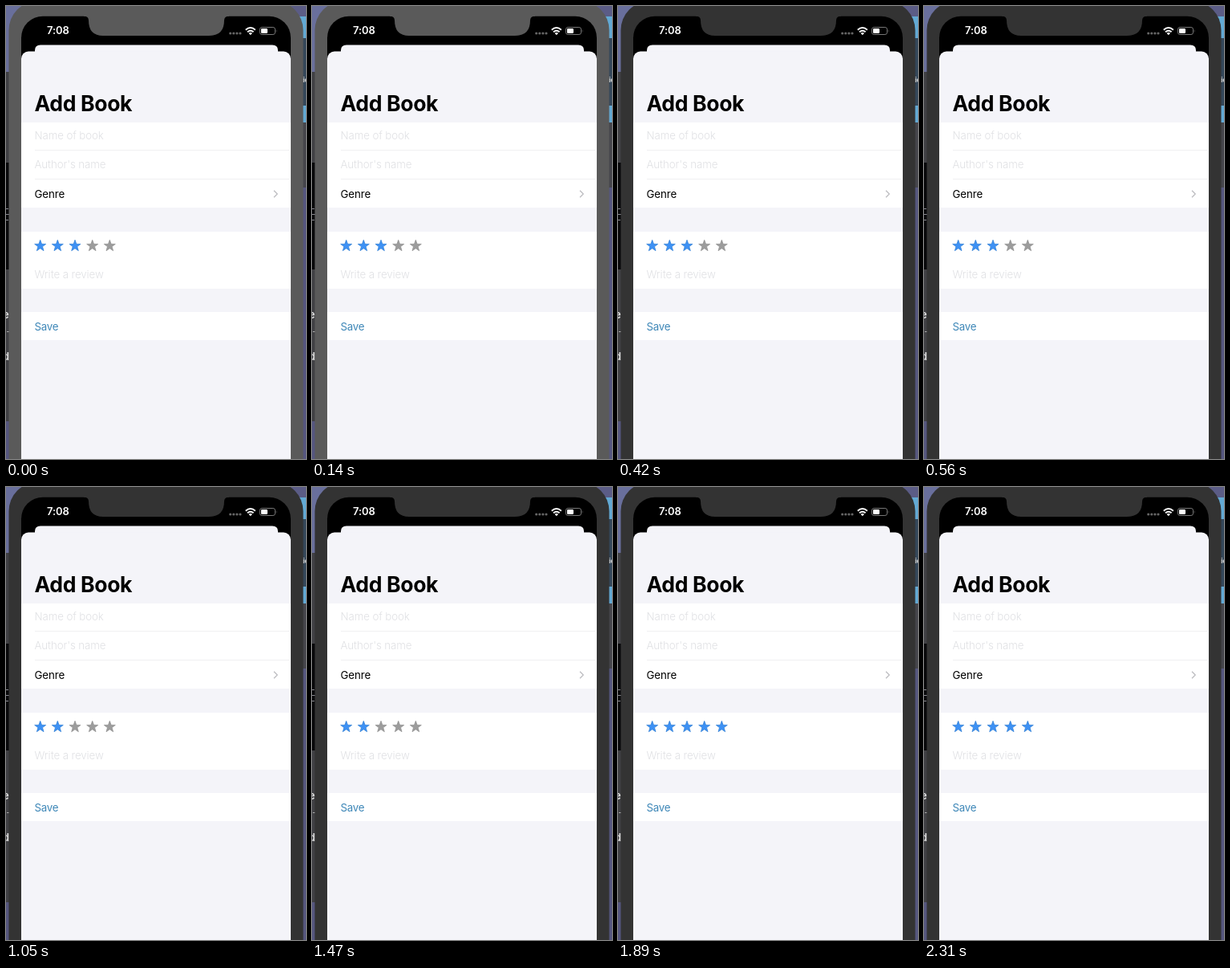
Write an HTML page that moves like this. It is 374 px wide and 564 px high and loops after 2380 ms.

```html
<!DOCTYPE html>
<html lang="en">
<head>
<meta charset="utf-8">
<title>Add Book</title>
<style>
  html, body { margin: 0; width: 100%; height: 100%; overflow: hidden; background: #55567f; }
  svg { display: block; width: 374px; height: 564px; }
  text { font: 400 13.3px Inter, "Open Sans", sans-serif; letter-spacing: -.1px; }
  .title { font-size: 26.6px; font-weight: 700; letter-spacing: -.38px; }
  .clock { font-size: 13px; font-weight: 600; letter-spacing: -.1px; fill: #fff; }
  .hint { font-weight: 300; fill: #e0e1e4; }
  .save { fill: #3f88b8; letter-spacing: -.25px; }
  .desk { font-size: 13px; font-weight: 700; fill: #ddd; }
  .sheet { fill: #f4f4f9; }
  .line { stroke: #f0f0f2; }
  .bezel { fill: #333; animation: bezel 2380ms step-end infinite; }
  .star { fill: #3d91f5; stroke: #3783d6; stroke-width: .8; }
  .s3, .s4, .s5 { animation: 2380ms step-end infinite; }
  .s3 { animation-name: third; }
  .s4 { animation-name: fourth; }
  .s5 { animation-name: fifth; }
  @keyframes bezel { 0% { fill: #5a5a5a; } 17.64%, 100% { fill: #333; } }
  @keyframes third {
    0%, 64.7% { fill: #3d91f5; stroke: #3783d6; }
    44.11% { fill: #9c9c9c; stroke: #949494; }
  }
  @keyframes fourth {
    0% { fill: #9c9c9c; stroke: #949494; }
    70.58%, 100% { fill: #3d91f5; stroke: #3783d6; }
  }
  @keyframes fifth {
    0% { fill: #9c9c9c; stroke: #949494; }
    76.47%, 100% { fill: #3d91f5; stroke: #3783d6; }
  }
</style>
</head>
<body>
<svg viewBox="0 0 374 564">
  <defs>
    <path id="star" d="M0-7.2 1.8-2.2 7-2.1 2.8 1.1 4.3 6.2 0 3.2-4.3 6.2-2.8 1.1-7-2.1-1.8-2.2Z"/>
  </defs>

  <!-- desktop behind the phone -->
  <g>
    <path fill="#696f9c" d="M0 0H40V82H0Z"/>
    <path fill="#404044" d="M0 82H8V517H0Z"/>
    <path fill="#08080a" d="M0 195H8V328H0Z"/>
    <path fill="#8a8a92" d="M0 252H3V253H0ZM0 259H4V260H0ZM0 266H3V267H0Z"/>
    <path fill="#5b5c86" d="M330 0H374V13H330Z"/>
    <path fill="#62a9d4" d="M364 13H374V145H364Z"/>
    <path fill="#34475a" d="M366 40H374V124H366Z"/>
    <path fill="#45454b" d="M364 145H374V226H364Z"/>
    <text class="desk" x="-4" y="389">e</text>
    <path fill="#aaa" d="M1 405H4V406H1Z"/>
    <text class="desk" x="-4" y="441">d</text>
    <text class="desk" x="370" y="95" style="font-size:9px">ic</text>
  </g>

  <!-- phone -->
  <rect class="bezel" x="3.5" y="-6" width="367" height="640" rx="36"/>
  <rect x="19" y="12.7" width="336" height="620" rx="27"/>
  <path class="bezel" d="M97 12V12.7Q103 12.7 103 18Q103 37 121 37H253Q272 37 272 18Q272 12.7 278 12.7V12Z"/>

  <!-- status bar -->
  <text class="clock" x="51" y="35.4">7:08</text>
  <g fill="#666">
    <circle cx="279.7" cy="34" r="1.6"/><circle cx="283.8" cy="34" r="1.6"/>
    <circle cx="287.9" cy="34" r="1.6"/><circle cx="292" cy="34" r="1.6"/>
  </g>
  <g fill="none" stroke="#fff" stroke-width="1.9">
    <path d="M298.8 29.8Q304.8 24.4 310.8 29.8M301 32.3Q304.8 29 308.6 32.3"/>
    <path fill="#fff" stroke="none" d="M302.5 33.8Q304.8 32 307.1 33.8L304.8 36.2Z"/>
  </g>
  <rect x="316.5" y="26.5" width="19" height="9" rx="2.6" fill="none" stroke="#777"/>
  <rect x="318" y="28" width="8" height="6" rx="1.2" fill="#fff"/>
  <path fill="#777" d="M336.8 29.5Q338.4 31 336.8 32.5Z"/>

  <!-- sheets -->
  <path class="sheet" d="M36 57V55Q36 48.5 43 48.5H332Q339 48.5 339 55V57Z"/>
  <rect class="sheet" x="19" y="56.5" width="336" height="540" rx="9"/>
  <text class="title" x="35.5" y="131">Add Book</text>

  <path fill="#fff" d="M19 145H355V251H19ZM19 281H355V352H19ZM19 381H355V416H19Z"/>
  <path class="line" d="M36 179.5H353M36 215.5H353"/>
  <text class="hint" x="35.5" y="166">Name of book</text>
  <text class="hint" x="35.5" y="202">Author's name</text>
  <text x="35.5" y="239">Genre</text>
  <path fill="none" stroke="#bdbdc1" stroke-width="1.3" d="M334 229.8 338.2 234 334 238.2"/>

  <g class="stars">
    <use class="star" href="#star" x="42.7" y="298.5"/>
    <use class="star" href="#star" x="64.3" y="298.5"/>
    <use class="star s3" href="#star" x="86" y="298.5"/>
    <use class="star s4" href="#star" x="107.7" y="298.5"/>
    <use class="star s5" href="#star" x="129.3" y="298.5"/>
  </g>
  <text class="hint" x="35.5" y="339">Write a review</text>
  <text class="save" x="35.5" y="404">Save</text>
</svg>
</body>
</html>
```
